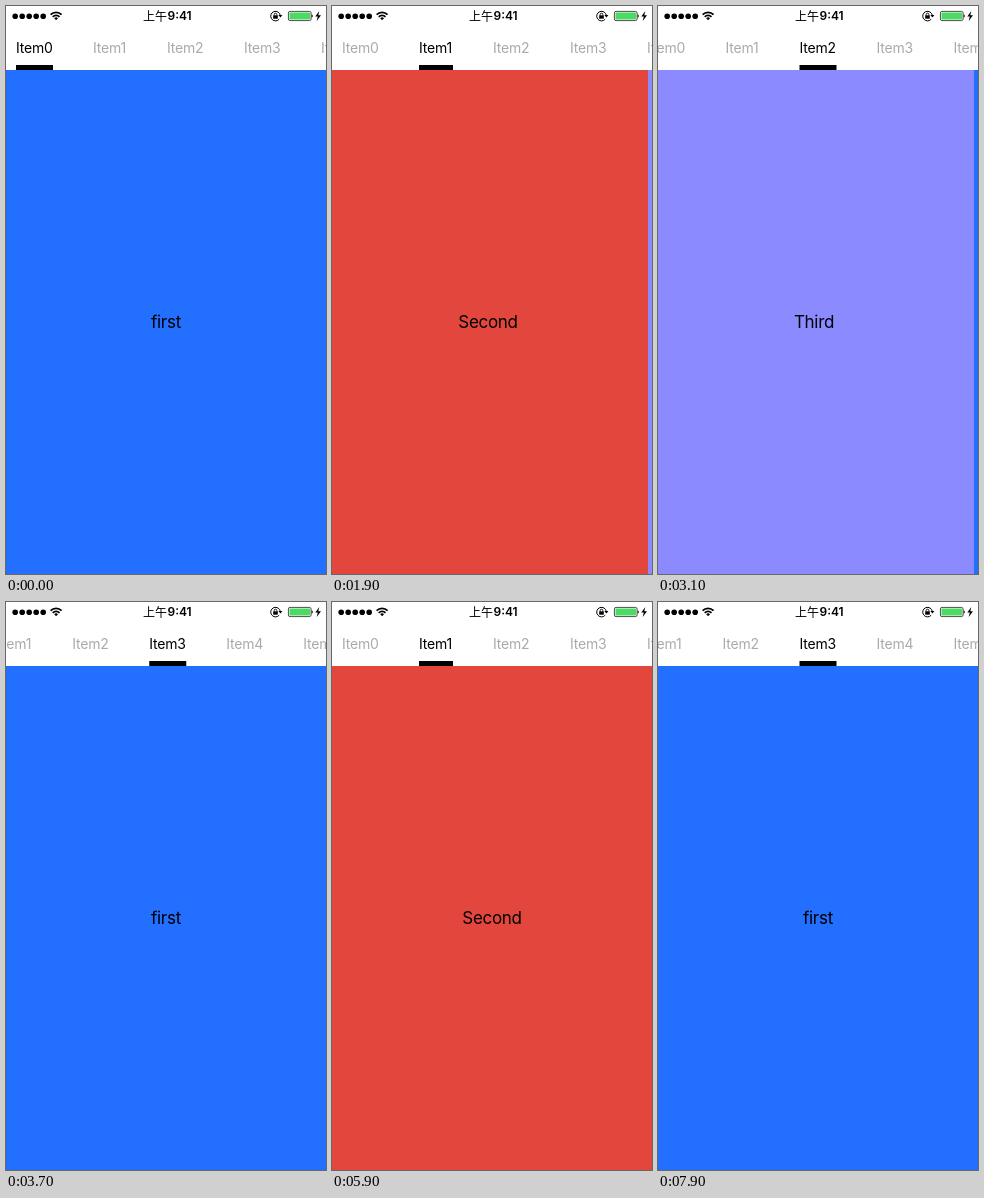
Animation, 320 px wide and 568 px high, one loop 8 s. Source, as an HTML page:

```html
<!DOCTYPE html>
<html>
<head>
<meta charset="utf-8">
<style>
html, body { margin: 0; width: 100%; height: 100%; overflow: hidden; background: #fff; }
svg { display: block; width: 320px; height: 568px; font-family: Inter, Roboto, sans-serif; }
.page text { font-size: 17px; letter-spacing: -.3px; text-anchor: middle; }
#tabs text { font-size: 14px; letter-spacing: -.2px; }
#clock { font-size: 12px; font-weight: 600; }
#ampm { font-family: "Noto Sans CJK SC", "Noto Sans CJK", sans-serif; font-weight: 500; }
</style>
</head>
<body>
<svg viewBox="0 0 320 568">
  <g class="page"><rect y="64" width="320" height="504"/><text x="160" y="322"></text></g>
  <g class="page"><rect y="64" width="320" height="504"/><text x="160" y="322"></text></g>
  <rect width="320" height="64" fill="#fff"/>
  <g id="tabs"><rect id="bar" y="59" height="5"/></g>
  <g id="dots"></g>
  <g fill="none" stroke="#000" stroke-width="1.7">
    <path d="M44.6 8.6a7.8 7.8 0 0 1 11 0M46.7 10.8a4.8 4.8 0 0 1 6.8 0"/>
    <path d="M50.1 14.2l-1.9-2a2.7 2.7 0 0 1 3.8 0z" fill="#000" stroke="none"/>
  </g>
  <g id="clock"><text id="ampm" x="137" y="14.5">上午</text><text x="161.5" y="14.3">9:41</text></g>
  <g fill="none" stroke="#000">
    <path d="M273.2 13.2a4.8 4.8 0 1 1 1.1-3.6"/>
    <path d="M272.4 9h4l-2 2.6z" fill="#000" stroke="none"/>
    <rect x="267.2" y="9.3" width="4.6" height="3.4" fill="#000" stroke="none"/>
    <path d="M268.2 9.5v-1a1.3 1.3 0 0 1 2.6 0v1" stroke-width=".9"/>
    <rect x="282.4" y="5.4" width="22.7" height="9.2" rx="1.6" stroke-width=".7"/>
    <rect x="283.5" y="6.5" width="20.5" height="7" rx=".6" fill="#4cd964" stroke="none"/>
    <path d="M305.6 8.3a1.8 1.8 0 0 1 0 3.4z" fill="#000" stroke="none"/>
    <path d="M313.3 5l-4 5.6h2.5l-1.1 4.4 4.3-5.8h-2.7z" fill="#000" stroke="none"/>
  </g>
</svg>
<script>
const $ = s => document.querySelector(s);
const LOOP = 8000, STEP = 200;
const looks = [["#236fff", "first"], ["#e2463c", "Second"], ["#8b8aff", "Third"]];
const tabX = [10, 87, 161, 238, 315, 392], tabW = [37, 34, 37, 37, 37, 37];

// Each entry: start, duration, value reached
const pageMoves = [[480, 300, 1], [1880, 300, 2], [3080, 300, 3], [5226, 350, 1], [7030, 350, 3]];
const barMoves = [[801, 150, 1], [2201, 150, 2], [3401, 150, 3], [5226, 150, 1], [7030, 150, 3]];
const scrollMoves = [[2227, 300, 19.5], [3427, 300, 96.5], [4050, 800, 0], [7030, 300, 96.5]];

const ease = p => (p = Math.min(1, Math.max(0, p)), p * p * (3 - 2 * p));
const track = (moves, t, start, map = v => v) =>
  moves.reduce((v, [t0, d, to]) => v + (map(to) - v) * ease((t - t0) / d), start);
const started = (moves, t) => moves.filter(m => m[0] <= t);

function add(parent, tag, attrs, text = "") {
  const el = document.createElementNS("http://www.w3.org/2000/svg", tag);
  for (const k in attrs) el.setAttribute(k, attrs[k]);
  el.textContent = text;
  return parent.appendChild(el);
}

for (let i = 0; i < 5; i++) add($("#dots"), "circle", { cx: 9.2 + i * 7, cy: 10.2, r: 2.8 });
const tabs = tabX.map((x, i) => add($("#tabs"), "text", { x, y: 47 }, "Item" + i));
const pages = document.querySelectorAll(".page");

function showPage(el, index, x) {
  const [color, label] = looks[index % 3];
  el.firstChild.setAttribute("fill", color);
  el.lastChild.textContent = label;
  el.setAttribute("transform", `translate(${x})`);
}

function draw(t) {
  const done = started(pageMoves, t);
  const [t0, d, to] = done.at(-1) || [0, 1, 0];
  const from = done.length > 1 ? done.at(-2)[2] : 0;
  const dir = to < from ? -1 : 1;
  const shift = Math.round(640 * ease((t - t0) / d)) / 2;
  showPage(pages[0], from, -dir * shift);
  showPage(pages[1], to, dir * (320 - shift));

  const selected = (started(barMoves, t).at(-1) || [0, 0, 0])[2];
  tabs.forEach((el, i) => el.setAttribute("fill", i === selected ? "#000" : "#aaa"));
  $("#bar").setAttribute("x", track(barMoves, t, tabX[0], i => tabX[i]));
  $("#bar").setAttribute("width", track(barMoves, t, tabW[0], i => tabW[i]));
  $("#tabs").setAttribute("transform", `translate(${-track(scrollMoves, t, 0)})`);
}

// The screen refreshes five times a second
function tick() {
  const t = performance.now() % LOOP;
  draw(Math.floor((t + 100) / STEP) * STEP - 100);
  requestAnimationFrame(tick);
}
tick();
</script>
</body>
</html>
```
